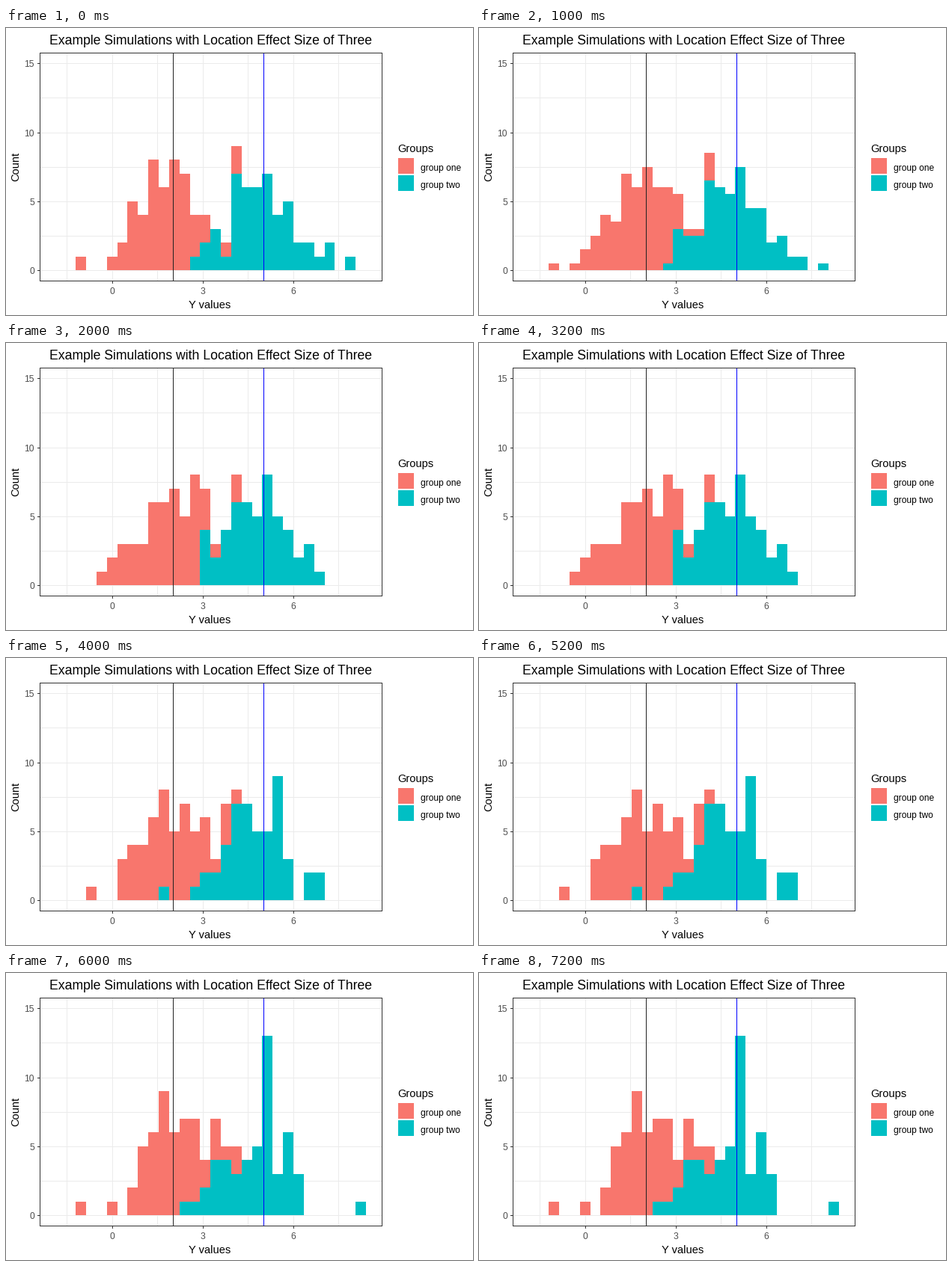
Animation, 624 px wide and 384 px high, one loop 8000 ms. Source, as a matplotlib script:

```python
import numpy as np
import matplotlib.pyplot as plt
from matplotlib.animation import FuncAnimation

W, H, DPI = 624, 384, 96
plt.rcParams["font.family"] = ["Liberation Sans", "DejaVu Sans"]
RED, TEAL = "#F8766D", "#00BFC4"
GRID, FRAME, TICK_TEXT = "#EBEBEB", "#333333", "#4D4D4D"

BINS = 28
EDGES = np.round(93.2 + 13.85 * np.arange(BINS + 1))
BASE, UNIT = 324, 18.46          # pixel row of zero, pixels per count
LEFT, TOP, RIGHT, BOTTOM = 45, 33, 502, 338


def counts(start, *values):
    row = np.zeros(BINS)
    row[start:start + len(values)] = values
    return row


# Each sample: height of the whole stack, height of group two
samples = [
    (counts(0, 1, 0, 0, 1, 2, 5, 4, 8, 6, 8, 7, 4, 4, 3, 2, 9),
     counts(11, 1, 2, 3, 1, 7, 6, 6, 7, 4, 5, 2, 2, 1, 2, 0, 1)),
    (counts(2, 1, 2, 3, 3, 3, 6, 6, 7, 5, 8, 7, 3, 4, 8),
     counts(12, 4, 2, 4, 6, 6, 5, 8, 5, 4, 2, 3, 1)),
    (counts(1, 1, 0, 0, 3, 4, 4, 6, 8, 5, 7, 5, 6, 3, 7, 8),
     counts(8, 1, 0, 0, 1, 2, 2, 4, 7, 7, 5, 5, 9, 3, 0, 2, 2)),
    (counts(0, 1, 0, 0, 1, 0, 2, 5, 6, 9, 6, 7, 7, 4, 7, 5, 5),
     counts(10, 1, 1, 2, 4, 4, 3, 4, 5, 13, 3, 6, 3)
     + counts(27, 1)),
]
# Position in the sample list for every second of the loop
STEPS = [0, 0.5, 1, 1, 2, 2, 3, 3]

fig = plt.figure(figsize=(W / DPI, H / DPI), dpi=DPI, facecolor="white")
ax = fig.add_axes([0, 0, 1, 1])
ax.set(xlim=(0, W), ylim=(H, 0))
ax.axis("off")


def box(x, y, w, h, color, z=1):
    ax.add_patch(plt.Rectangle((x, y), w, h, fc=color, lw=0,
                               antialiased=False, zorder=z))


def label(x, y, text, px, color="black", ha="left", **kw):
    kw.setdefault("va", "baseline")
    ax.text(x, y, text, fontsize=px * 72 / DPI, color=color, ha=ha, **kw)


def vline(x, color, z):
    box(x, TOP, 1, BOTTOM - TOP, color, z)


# Grid
for x in (81, 142, 202, 263, 323, 384, 444):
    vline(x, GRID, 1)
for y in (47, 93, 140, 186, 232, 278, 324):
    box(LEFT, y, RIGHT - LEFT, 1, GRID)

# Bars
bar_style = dict(fill=True, lw=0, antialiased=False, baseline=BASE)
stack = ax.stairs(np.full(BINS, BASE), EDGES, color=RED, zorder=2, **bar_style)
front = ax.stairs(np.full(BINS, BASE), EDGES, color=TEAL, zorder=3, **bar_style)

# Group means
vline(223, "#222222", 4)
vline(344, "#0000FF", 4)

# Panel border
box(LEFT, TOP, RIGHT - LEFT + 1, 1, FRAME, 5)
box(LEFT, BOTTOM, RIGHT - LEFT + 1, 1, FRAME, 5)
box(LEFT, TOP, 1, BOTTOM - TOP, FRAME, 5)
box(RIGHT, TOP, 1, BOTTOM - TOP, FRAME, 5)

# Ticks
for x, text in ((142, "0"), (263, "3"), (384, "6")):
    box(x, BOTTOM, 1, 4, FRAME, 5)
    label(x, 356, text, 12, TICK_TEXT, "center")
for y, text in ((324, "0"), (232, "5"), (140, "10"), (47, "15")):
    box(LEFT - 3, y, 3, 1, FRAME, 5)
    label(38, y + 5, text, 12, TICK_TEXT, "right")

# Titles
label(273, 22, "Example Simulations with Location Effect Size of Three",
      17.6, ha="center")
label(272.5, 375, "Y values", 14.67, ha="center")
label(20, 185, "Count", 14.67, ha="right", va="center", rotation=90)

# Legend
label(523, 166, "Groups", 14.67)
for y, color, text in ((174, RED, "group one"), (197, TEAL, "group two")):
    box(524, y, 21, 21, color)
    label(554, y + 17, text, 12)


def update(i):
    pos = STEPS[i]
    a = int(pos)
    b = min(a + 1, len(samples) - 1)
    t = pos - a
    for artist, lo, hi in zip((stack, front), samples[a], samples[b]):
        height = lo * (1 - t) + hi * t
        artist.set_data(values=np.round(BASE - UNIT * height))
    return stack, front


anim = FuncAnimation(fig, update, frames=len(STEPS), interval=1000,
                     repeat=True, repeat_delay=0)
plt.show()
```
